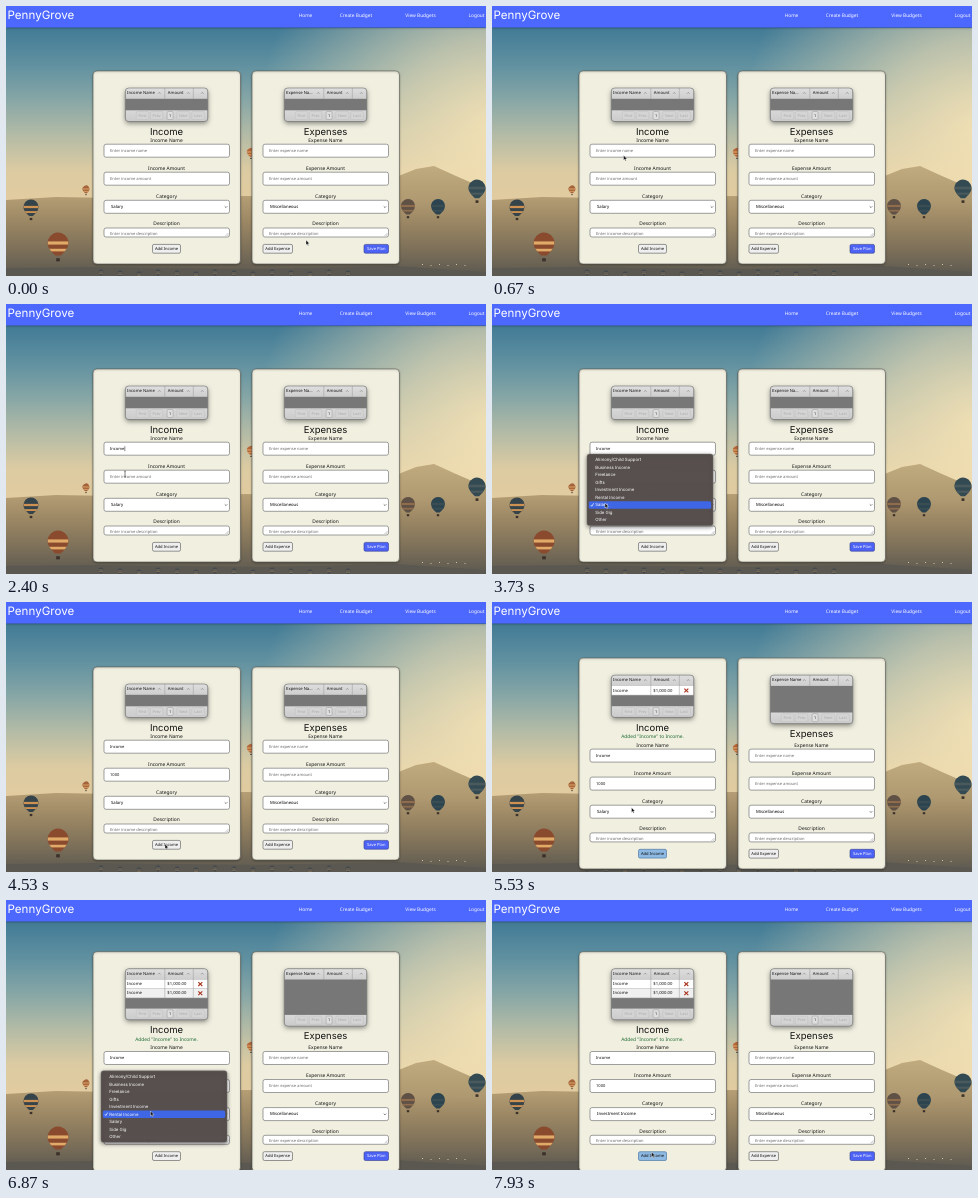
Animation, 480 px wide and 270 px high, one loop 8 s. Source, as an HTML page with a canvas:

```html
<!DOCTYPE html>
<html lang="en">
<head>
<meta charset="utf-8">
<title>Budget planner</title>
<style>
  html, body { margin: 0; width: 100%; height: 100%; overflow: hidden; }
  canvas { display: block; width: 100vw; height: 100vh; }
</style>
</head>
<body>
<canvas id="stage"></canvas>
<script>
const W = 480, H = 270, LOOP = 8000;
const BODY = '"Noto Sans", "Open Sans", sans-serif';
const HEAD = 'Inter, Roboto, sans-serif';
const canvas = document.getElementById('stage');
const ratio = Math.max(1, window.devicePixelRatio || 1);
canvas.width = W * ratio;
canvas.height = H * ratio;
const ctx = canvas.getContext('2d');
ctx.scale(ratio, ratio);
ctx.textBaseline = 'middle';
ctx.textRendering = 'geometricPrecision';

const CATEGORIES = ['Alimony/Child Support', 'Business Income', 'Freelance', 'Gifts',
  'Investment Income', 'Rental Income', 'Salary', 'Side Gig', 'Other'];
const HEADER = 10.8, ROW = 9.2, FOOTER = 11.2, ROW_GROWTH = 8.8, STATUS = 9;
const ITEM = 7.5, COLUMN_GAP = 159;

// Pointer path: time, x, y of the tip
const PATH = [[0, 300, 234], [800, 119, 143], [2050, 119, 143], [2380, 119, 170],
  [3400, 119, 170], [3620, 113, 199], [4000, 113, 199], [4500, 159, 242], [5150, 159, 242],
  [5500, 139.5, 205.5], [5700, 139.5, 205.5], [5880, 142, 201], [6020, 142, 201],
  [6300, 159, 251], [6480, 159, 251], [6780, 144.5, 211], [6930, 144.5, 211],
  [7150, 146, 204], [7280, 146, 204], [7640, 159.5, 252], [LOOP, 159.5, 252]];
// Open menus: start, end, checked category
const MENUS = [[3650, 3920, 6], [5650, 6000, 6], [6830, 7250, 5]];
const within = (t, a, b) => t >= a && t < b;
const typed = (text, t, start, step) =>
  text.slice(0, Math.max(0, Math.floor((t - start) / step) + 1));

function pointerAt(t) {
  const i = Math.max(1, PATH.findIndex(p => p[0] > t));
  const [t0, x0, y0] = PATH[i - 1], [t1, x1, y1] = PATH[i];
  const k = (t - t0) / (t1 - t0), e = k * k * (3 - 2 * k);
  return { x: x0 + (x1 - x0) * e, y: y0 + (y1 - y0) * e };
}

function stateAt(t) {
  const rows = t < 4650 ? 0 : t < 6400 ? 1 : 2;
  return {
    rows, grow: rows ? STATUS + ROW_GROWTH * rows : 0,
    name: typed('Income', t, 990, 135),
    amount: typed('1000', t, 2620, 140),
    caret: within(t, 860, 2470) ? 'name' : within(t, 2470, 3650) ? 'amount' : '',
    category: t < 6000 ? 6 : t < 7250 ? 5 : 4,
    active: within(t, 4600, 5650) || within(t, 6350, 6830) || t >= 7700,
    menu: MENUS.find(m => within(t, m[0], m[1])),
    pointer: pointerAt(t),
    pointerHidden: within(t, 980, 2050) || within(t, 2610, 3400),
    beam: within(t, 760, 2130) || within(t, 2300, 3460)
  };
}

function text(str, x, y, size, color = '#111', align = 'left', font = BODY, weight = 400) {
  ctx.font = `${weight} ${size}px ${font}`;
  ctx.textAlign = align;
  ctx.fillStyle = color;
  ctx.fillText(str, x, y);
}

function box(x, y, w, h, r, fill, stroke, width = 0.6) {
  ctx.beginPath();
  ctx.roundRect(x, y, w, h, r);
  if (fill) { ctx.fillStyle = fill; ctx.fill(); }
  if (stroke) { ctx.strokeStyle = stroke; ctx.lineWidth = width; ctx.stroke(); }
}

function shadowed(blur, dy, color, draw) {
  ctx.save();
  ctx.shadowBlur = blur * ratio;
  ctx.shadowOffsetY = dy * ratio;
  ctx.shadowColor = color;
  draw();
  ctx.restore();
}

function line(points, color, width = 0.6) {
  ctx.beginPath();
  points.forEach(([x, y]) => ctx.lineTo(x, y));
  ctx.strokeStyle = color;
  ctx.lineWidth = width;
  ctx.stroke();
}

function shape(points, fill) {
  ctx.beginPath();
  points.forEach(([x, y]) => ctx.lineTo(x, y));
  ctx.closePath();
  ctx.fillStyle = fill;
  ctx.fill();
}

function fade(y0, y1, colors) {
  const g = ctx.createLinearGradient(0, y0, 0, y1);
  colors.forEach((c, i) => g.addColorStop(i / (colors.length - 1), c));
  return g;
}

function balloon(x, y, r, color, band) {
  ctx.save();
  ctx.beginPath();
  ctx.arc(x, y, r, Math.PI * 0.85, Math.PI * 0.15);
  ctx.quadraticCurveTo(x + r * 0.7, y + r * 0.8, x + r * 0.25, y + r * 1.2);
  ctx.lineTo(x - r * 0.25, y + r * 1.2);
  ctx.quadraticCurveTo(x - r * 0.7, y + r * 0.8, x - r * 0.89, y + r * 0.45);
  ctx.fillStyle = color;
  ctx.fill();
  ctx.clip();
  ctx.fillStyle = band;
  ctx.fillRect(x - r, y - r * 0.15, r * 2, r * 0.3);
  ctx.fillRect(x - r, y + r * 0.55, r * 2, r * 0.25);
  ctx.restore();
  ctx.fillStyle = '#3b302a';
  ctx.fillRect(x - r * 0.17, y + r * 1.45, r * 0.34, r * 0.3);
}

function landscape() {
  ctx.fillStyle = fade(22, 200, ['#427b96', '#5f90a0', '#86a6a6', '#b3bba6', '#dccba2', '#e3cb9f']);
  ctx.fillRect(0, 0, W, H);
  const glow = ctx.createRadialGradient(490, 125, 0, 490, 125, 240);
  glow.addColorStop(0, 'rgba(245,226,180,.95)');
  glow.addColorStop(0.4, 'rgba(240,222,180,.65)');
  glow.addColorStop(1, 'rgba(235,220,180,0)');
  ctx.fillStyle = glow;
  ctx.fillRect(0, 22, W, H);
  shape([[380, 200], [390, 171], [410, 163], [428, 160], [450, 170], [480, 183], [480, 215]],
    fade(160, 215, ['#c0aa7e', '#a59069']));
  shape([[0, 270], [0, 194], [50, 191], [110, 192], [240, 190], [390, 192], [480, 198], [480, 270]],
    fade(190, 270, ['#b59e75', '#9a8663', '#7d7059', '#5b5850']));
  shape([[0, 270], [0, 262], [90, 261], [250, 263], [390, 260], [480, 266], [480, 270]], '#5a5851');
  balloon(25, 201, 7.5, '#35434b', '#cf9152');
  balloon(52, 237, 10.5, '#8a4a2e', '#e0aa68');
  balloon(80, 183, 3.5, '#a5633c', '#d9a263');
  balloon(245, 146, 4, '#b5663a', '#d9a263');
  balloon(402, 200, 7, '#5f5145', '#8e6c4c');
  balloon(432, 200, 7, '#2c444f', '#3a4d53');
  balloon(471, 182, 8.5, '#344a53', '#4a5a5c');
  for (let i = 0; i < 14; i++) balloon(95 + i * 19, 266 + i * 7 % 3, 2.5, '#43494c', '#8f7a5d');
  for (let i = 0; i < 6; i++) {
    ctx.fillStyle = 'rgba(255,235,200,.7)';
    ctx.fillRect(416 + i * 8.5, 258 + i % 2, 1, 1);
  }
}

function navBar() {
  shadowed(2, 0.5, 'rgba(0,0,0,.4)', () => box(0, 0, W, 21.5, 0, '#4d68ff'));
  text('PennyGrove', 1.5, 10, 11.6, '#fff', 'left', HEAD);
  [['Home', 299.5], ['Create Budget', 350], ['View Budgets', 414.5], ['Logout', 470.5]]
    .forEach(([label, x]) => text(label, x, 9.6, 4.8, '#fff', 'center', BODY, 500));
}

function sortArrow(x, y) {
  line([[x - 1.2, y + 0.7], [x, y - 0.6], [x + 1.2, y + 0.7]], '#777', 0.6);
}

function table(x, y, h, title, rows) {
  const w = 82.5, foot = y + h - FOOTER;
  shadowed(5, 2, 'rgba(0,0,0,.45)', () => box(x, y, w, h, 3.5, '#777'));
  ctx.save();
  box(x, y, w, h, 3.5);
  ctx.clip();
  ctx.fillStyle = fade(y, y + HEADER, ['#dedede', '#cecece']);
  ctx.fillRect(x, y, w, HEADER);
  for (let i = 0; i < rows; i++) {
    const top = y + HEADER + i * ROW, mid = top + ROW / 2;
    ctx.fillStyle = i % 2 ? '#f0f0f0' : '#fff';
    ctx.fillRect(x, top, w, ROW);
    line([[x, top + ROW], [x + w, top + ROW]], '#aaa', 0.4);
    text('Income', x + 1.8, mid, 4.2);
    text('$1,000.00', x + 42, mid, 4.2);
    line([[x + 73, mid - 1.9], [x + 77, mid + 1.9]], '#a8301a', 1.1);
    line([[x + 77, mid - 1.9], [x + 73, mid + 1.9]], '#a8301a', 1.1);
  }
  ctx.fillStyle = fade(foot, y + h, ['#d8d8d8', '#cbcbcb']);
  ctx.fillRect(x, foot, w, FOOTER);
  [39.5, 68].forEach(dx => line([[x + dx, y], [x + dx, y + HEADER + rows * ROW]], '#999', 0.5));
  text(title, x + 1.8, y + 4.9, 4.2);
  text('Amount', x + 42.5, y + 4.9, 4.2);
  [34, 63, 77].forEach(dx => sortArrow(x + dx, y + 5));
  [['First', 11, 12.5], ['Prev', 25, 12.5], ['1', 41.8, 6], ['Next', 51.5, 13], ['Last', 66.5, 12.5]]
    .forEach(([label, dx, bw]) => {
      const current = label === '1';
      box(x + dx, foot + 1.2, bw, 8, 1, current ? '#dedede' : '#d4d4d4', current ? '#888' : '#bbb', 0.4);
      text(label, x + dx + bw / 2, foot + 5.2, 3.9, current ? '#222' : '#aaa', 'center');
    });
  ctx.restore();
  box(x, y, w, h, 3.5, null, '#777', 0.6);
}

function field(x, y, value, hint, focused) {
  box(x, y, 125.5, 13, 2, '#fff', '#777', 0.7);
  text(value || hint, x + 6, y + 6.7, 4.05, value ? '#111' : '#6c6c6c');
  if (focused) {
    const end = x + 6.5 + (value ? ctx.measureText(value).width : 0);
    line([[end, y + 4], [end, y + 9]], '#111', 0.5);
  }
}

function button(label, x, y, w, fill, color = '#111', border = '#555') {
  box(x, y, w, 8.8, 1.5, fill, border, 0.6);
  text(label, x + w / 2, y + 4.4, 4.1, color, 'center');
}

function card(x, kind, title, s, left) {
  const shift = s.grow / 2, top = 65 - shift, lower = kind.toLowerCase();
  shadowed(2, 0.8, 'rgba(0,0,0,.3)', () => box(x, top, 147.5, 193 + s.grow, 4, '#f0efe0', '#5a5a52', 0.6));
  const header = left || s.rows ? `${kind} Name` : 'Expense Na…';
  const stretch = left ? s.rows * ROW_GROWTH : Math.max(0, s.grow - 2.7);
  const height = 33.5 + stretch;
  table(x + 32.3, top + 17, height, header, left ? s.rows : 0);

  const mid = x + 73.5, titleY = top + 17 + height + 10.3;
  text(title, mid, titleY, 9.5, '#111', 'center', HEAD);
  if (left && s.rows) text('Added "Income" to Income.', mid, titleY + 9.4, 4.85, '#206c34', 'center');

  const fx = x + 11;
  const label = (str, y) => text(str, mid, y + shift, 4.9, '#111', 'center');
  label(`${kind} Name`, 134.3);
  field(fx, 138.2 + shift, left ? s.name : '', `Enter ${lower} name`, left && s.caret === 'name');
  label(`${kind} Amount`, 162.3);
  field(fx, 166.2 + shift, left ? s.amount : '', `Enter ${lower} amount`, left && s.caret === 'amount');

  label('Category', 190.4);
  const sy = 194.3 + shift;
  box(fx, sy, 125.5, 13, 2, '#fff', '#777', 0.7);
  text(left ? CATEGORIES[s.category] : 'Miscellaneous', fx + 7, sy + 6.5, 4.25, '#000', 'left', BODY, 500);
  line([[fx + 120.7, sy + 6], [fx + 122, sy + 7.3], [fx + 123.3, sy + 6]], '#333', 0.6);

  label('Description', 218);
  const dy = 222 + shift;
  box(fx, dy, 125.5, 9, 2, '#fff', '#777', 0.7);
  text(`Enter ${lower} description`, fx + 6, dy + 6, 4.05, '#6c6c6c');
  line([[fx + 121.5, dy + 8], [fx + 124.5, dy + 5]], '#777', 0.4);
  line([[fx + 123.2, dy + 8], [fx + 124.7, dy + 6.5]], '#777', 0.4);

  const by = 238.4 + shift;
  if (left) {
    button('Add Income', x + 59.5, by, 28, s.active ? '#8db9e2' : '#efefef', '#111', s.active ? '#3d6b9b' : '#555');
  } else {
    button('Add Expense', fx, by, 29.5, '#efefef');
    button('Save Plan', fx + 101, by, 24.5, '#4d63f5', '#fff', '#333c88');
  }
}

function menu(s) {
  const checked = s.menu[2];
  const first = 201 + s.grow / 2 - checked * ITEM;
  const hover = Math.round((s.pointer.y - first) / ITEM);
  shadowed(4, 1.5, 'rgba(0,0,0,.5)', () =>
    box(95, first - 6, 126, ITEM * 8 + 11.5, 2.5, 'rgba(86,79,77,.98)', '#77706d', 0.4));
  CATEGORIES.forEach((name, i) => {
    const y = first + i * ITEM;
    if (i === hover) box(96.8, y - 3.8, 122.4, ITEM, 1.5, '#3f66e4');
    text(name, 103.3, y, 4.35, '#fff', 'left', HEAD);
    if (i === checked) line([[98.8, y], [99.8, y + 1.3], [101.6, y - 1.7]], '#fff', 0.7);
  });
}

function pointer({ x, y }, beam) {
  if (beam) {
    line([[x - 1, y - 3], [x, y - 2.5], [x + 1, y - 3]], '#222', 0.5);
    line([[x, y - 2.5], [x, y + 2.5]], '#222', 0.6);
    line([[x - 1, y + 3], [x, y + 2.5], [x + 1, y + 3]], '#222', 0.5);
    return;
  }
  const tip = [[0, 0], [0, 5], [1.1, 4], [1.9, 5.7], [2.7, 5.3], [1.9, 3.7], [3.5, 3.6]]
    .map(([dx, dy]) => [x + dx, y + dy]);
  shape(tip, '#111');
  line([...tip, tip[0]], '#fff', 0.4);
}

function frame(now) {
  const s = stateAt(now % LOOP);
  landscape();
  card(87, 'Income', 'Income', s, true);
  card(87 + COLUMN_GAP, 'Expense', 'Expenses', s, false);
  navBar();
  if (s.menu) menu(s);
  if (!s.pointerHidden) pointer(s.pointer, s.beam);
  requestAnimationFrame(() => frame(performance.now() - start));
}

const start = performance.now();
frame(0);
</script>
</body>
</html>
```
